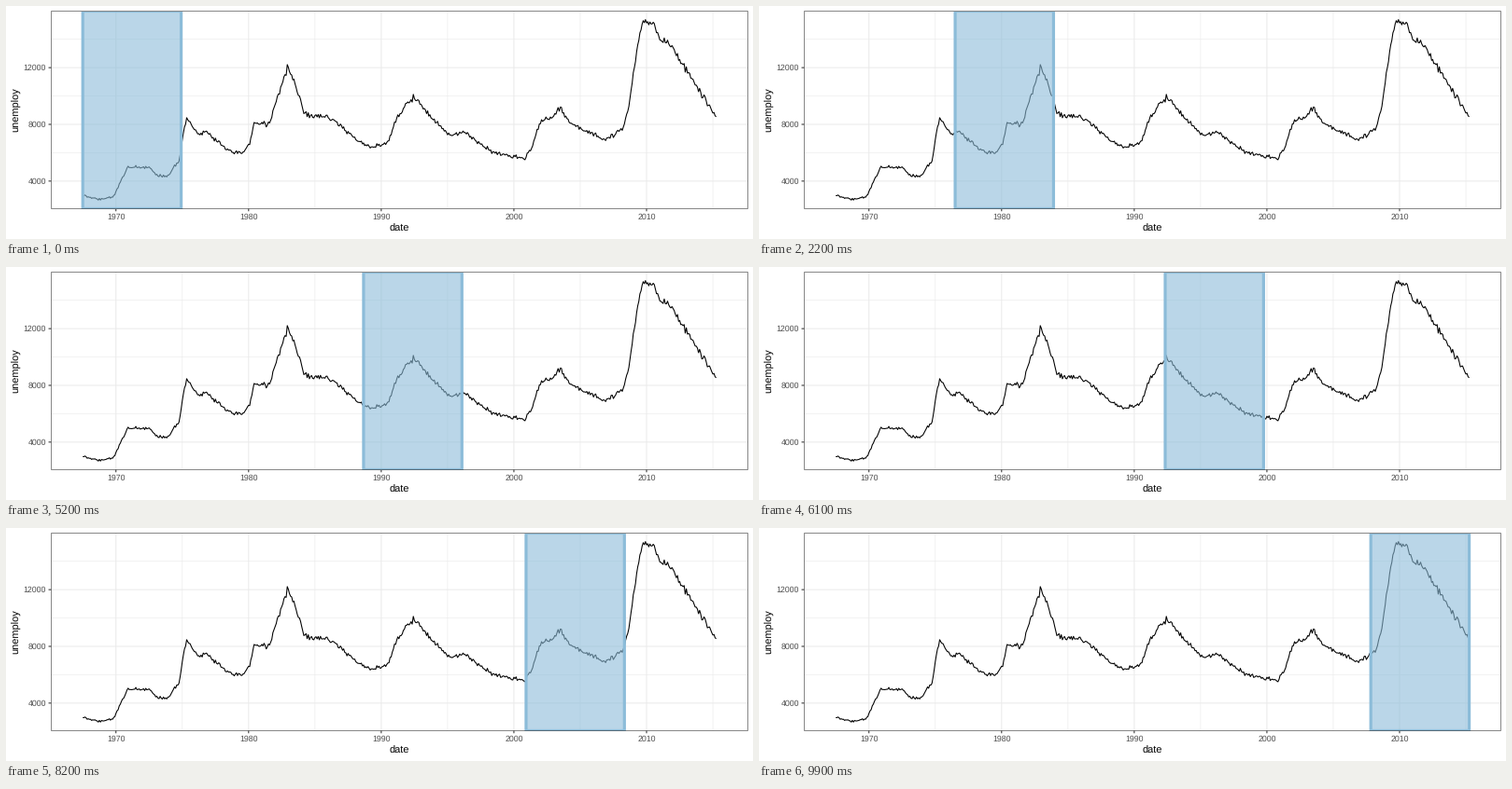
Write a matplotlib script that moves like this. It is 800x250 px and loops after 10 s.

```python
import matplotlib.pyplot as plt
import numpy as np
from matplotlib.animation import FuncAnimation
from matplotlib.patches import Rectangle

plt.rcParams["font.family"] = "Liberation Sans"
plt.rcParams["text.hinting"] = "none"
plt.rcParams["path.snap"] = False

W, H, DPI = 800, 250, 100
PX = 72 / DPI  # points per pixel
LEFT, RIGHT, TOP, BOTTOM = 48.3, 794.5, 5.5, 217.5
MONTHS, WINDOW, FRAMES = 574, 90, 100
FIRST, LAST = 1967.5, 2015.25
LOW, HIGH = 2685, 15352
BLUE, GRID, DARK = "#8cbcd9", "#ebebeb", "#333333"

# Turning points of the series: years since 1900, thousands of thousands
TURNS = [
    (67.5, 3.0), (68.7, 2.7), (69.8, 2.9), (70.9, 5.0), (72.5, 4.95),
    (73.1, 4.4), (73.8, 4.3), (74.75, 5.4), (75.1, 7.6), (75.35, 8.4),
    (76.2, 7.25), (76.8, 7.5), (78.3, 6.2), (79.5, 5.95), (80.1, 6.65),
    (80.4, 8.1), (81.55, 8.0), (82.92, 12.0), (83.4, 11.2), (84.2, 8.75),
    (86.4, 8.35), (88.3, 6.75), (89.2, 6.35), (90.5, 6.7), (91.2, 8.5),
    (92.45, 9.95), (94.0, 8.3), (95.1, 7.25), (96.3, 7.4), (98.3, 6.1),
    (100.8, 5.6), (101.3, 6.25), (102.0, 8.2), (103.0, 8.6), (103.45, 9.15),
    (104.2, 8.2), (106.9, 6.85), (108.25, 7.75), (108.7, 9.5), (109.3, 13.5),
    (109.75, 15.2), (110.3, 15.2), (111.1, 13.9), (111.7, 13.8), (115.25, 8.5),
]


def unemployment():
    at, level = np.transpose(TURNS)
    trend = 1e6 * np.interp(67.5 + np.arange(MONTHS) / 12, at, level) / 1000
    jitter = np.random.default_rng(4).normal(0, 0.012, MONTHS)
    return trend * (1 + jitter.clip(-0.025, 0.025))


def expand(value, low, high):
    pad = 0.05 * (high - low)
    return (value - low + pad) / (high - low + 2 * pad)


def year_x(year):
    return LEFT + (RIGHT - LEFT) * expand(year, FIRST, LAST)


def month_x(month):
    return year_x(FIRST + month / 12)


def value_y(value):
    return BOTTOM - (BOTTOM - TOP) * expand(value, LOW, HIGH)


fig = plt.figure(figsize=(W / DPI, H / DPI), dpi=DPI, facecolor="white")
ax = fig.add_axes([0, 0, 1, 1])
ax.set(xlim=(0, W), ylim=(H, 0))
ax.axis("off")


def stroke(xs, ys, color, width, z):
    ax.plot(xs, ys, color=color, lw=width * PX, zorder=z, solid_capstyle="butt")


def label(x, y, text, size, color, ha="center", **kw):
    ax.text(x, y, text, fontsize=size * PX, color=color, ha=ha, va="baseline", **kw)


def grid_x(year, width):
    stroke([year_x(year)] * 2, [TOP, BOTTOM], GRID, width, 0)


def grid_y(value, width):
    stroke([LEFT, RIGHT], [value_y(value)] * 2, GRID, width, 0)


for year in range(1975, 2016, 10):
    grid_x(year, 0.65)
for value in (6000, 10000, 14000):
    grid_y(value, 0.65)
for year in range(1970, 2011, 10):
    x = year_x(year)
    grid_x(year, 1.07)
    stroke([x, x], [BOTTOM, BOTTOM + 2.75], DARK, 1.07, 3)
    label(x, 228.8, str(year), 8.8, "#4d4d4d")
for value in (4000, 8000, 12000):
    y = value_y(value)
    grid_y(value, 1.07)
    stroke([LEFT - 2.75, LEFT], [y, y], DARK, 1.07, 3)
    label(43.1, y + 3.15, str(value), 8.8, "#4d4d4d", ha="right")

label((LEFT + RIGHT) / 2, 242.2, "date", 11, "black")
label(13.6, (TOP + BOTTOM) / 2, "unemploy", 11, "black",
      rotation=90, rotation_mode="anchor")

stroke(month_x(np.arange(MONTHS)), value_y(unemployment()), "black", 1.07, 1)

panel = Rectangle((48.5, TOP), RIGHT - 48.5, BOTTOM - TOP, fill=False,
                  ec=DARK, alpha=0.58, lw=PX, zorder=4)
ax.add_patch(panel)

box = dict(xy=(month_x(0), TOP), width=month_x(WINDOW - 1) - month_x(0),
           height=BOTTOM - TOP)
shade = Rectangle(**box, fc=BLUE, alpha=0.6, lw=0, zorder=2)
edge = Rectangle(**box, fill=False, ec=BLUE, lw=3.2 * PX, zorder=3)
for patch in (shade, edge):
    ax.add_patch(patch)
    patch.set_clip_path(panel)


def draw(i):
    # The window advances steadily, in whole months
    start = round((MONTHS - WINDOW) * i / (FRAMES - 1))
    for patch in (shade, edge):
        patch.set_x(month_x(start))
    return shade, edge


anim = FuncAnimation(fig, draw, frames=FRAMES, interval=100, repeat=True)
plt.show()
```
